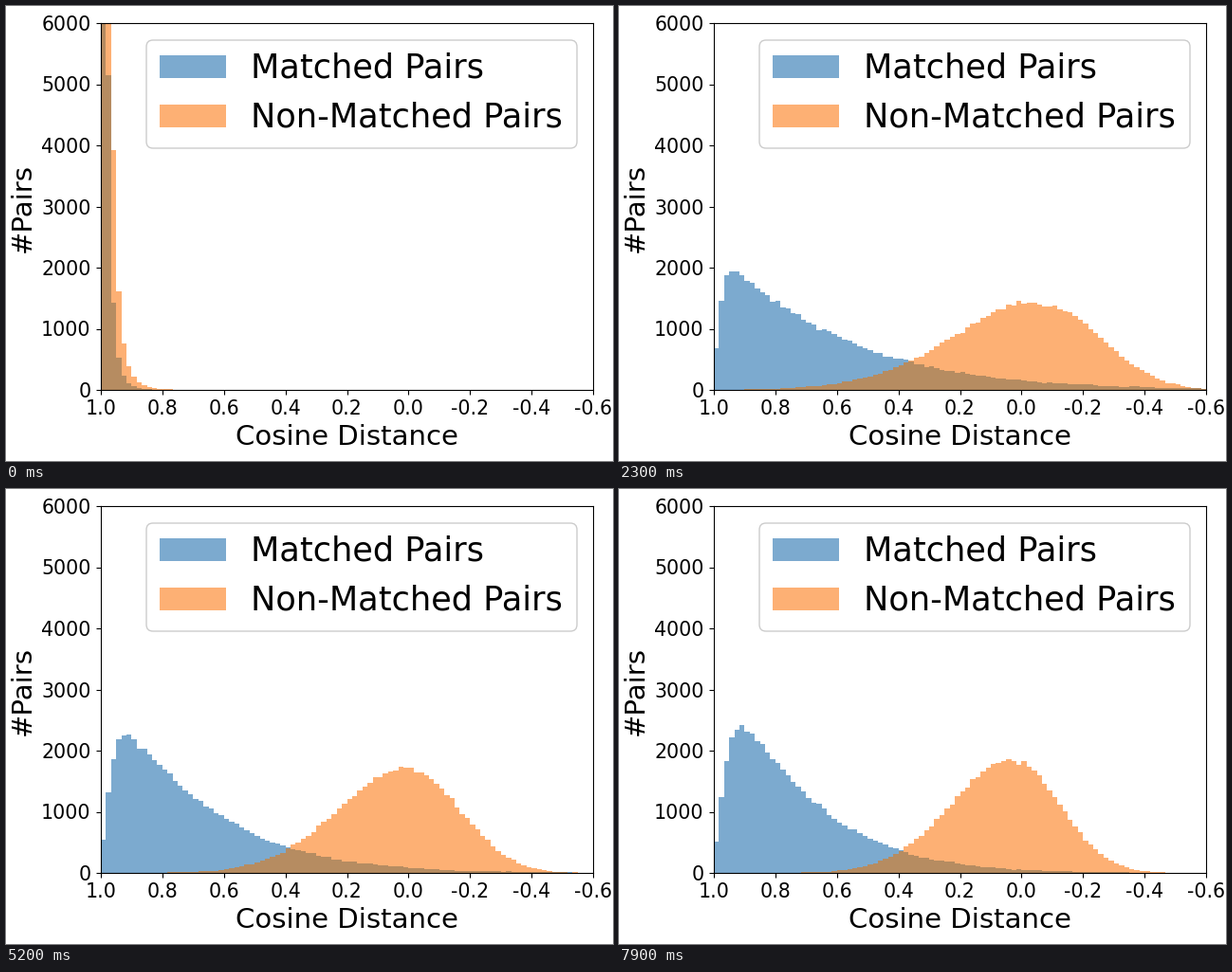
A matplotlib script that plays this animation: 640 by 480 pixels, repeating every 8 s.

```python
import numpy as np
import matplotlib.pyplot as plt
from matplotlib.animation import FuncAnimation
from matplotlib.patches import FancyBboxPatch, Rectangle

W, H, DPI = 640, 480, 100
FRAMES, STEP = 80, 100
BINS = 120
SETTLE = 1.6  # seconds until the first spreading is done
BLUE, ORANGE, BOTH = "#7caacf", "#fdb074", "#b68c61"
TICK, LABEL, LEGEND = 14.8, 21, 25.25

plt.rcParams["font.family"] = "DejaVu Sans"
bins = np.arange(BINS)


def start_shape(first, rate):
    """Steep pile at distance 1.0; `first` is the height of the second bar."""
    return np.minimum(first * np.exp(-rate * (np.sqrt(bins) - 1)), 40000)


def match_shape(g):
    """Quick rise, then a stretched exponential fall."""
    rise = 1 - np.exp(-((bins + 1) / (1.5 + 0.85 * g)) ** 1.6)
    fall = np.exp(-(bins / (27 - 4.3 * g)) ** (1.1 + 0.115 * g))
    return (1950 + 630 * g) * rise * fall


def other_shape(g):
    """Bell with different width and steepness on either side."""
    d = bins - (62 - 3 * g)
    width = np.where(d < 0, 23.5 - 4.4 * g, 20.2 - 4.2 * g)
    power = np.where(d < 0, 1.75 + 0.1 * g, 2.5 - 0.25 * g)
    return (1300 + 340 * g) * np.exp(-(np.abs(d) / width) ** power)


def transport(a, b, s):
    """Move the mass of histogram a towards b by blending their quantiles."""
    edges = np.arange(BINS + 1)
    u = (np.arange(20000) + 0.5) / 20000

    def quantile(h):
        cdf = np.concatenate([[0], np.cumsum(h + 1e-9)])
        return np.interp(u, cdf / cdf[-1], edges)

    pos = (1 - s) * quantile(a) + s * quantile(b)
    total = (1 - s) * a.sum() + s * b.sum()
    return np.histogram(pos, edges)[0] * total / len(u)


def counts(t, start, shape, rng):
    if t == 0:
        return start
    if t < SETTLE:
        h = transport(start, shape(0), np.sin(np.pi / 2 * t / SETTLE))
    else:
        h = shape(np.log(t / SETTLE))
    return np.clip(h + 0.6 * np.sqrt(h) * rng.standard_normal(BINS), 0, None)


SERIES = [(start_shape(5150, 3.1), match_shape),
          (start_shape(12500, 2.8), other_shape)]

fig = plt.figure(figsize=(W / DPI, H / DPI), dpi=DPI, facecolor="white")

# Chart
ax = fig.add_axes([100 / W, 75 / H, 519 / W, 387 / H])
ax.set_xlim(1, -0.6)
ax.set_ylim(0, 6000)
xticks = np.arange(10, -7, -2) / 10
ax.set_xticks(xticks, [f"{x:.1f}" for x in xticks])
ax.set_yticks(range(0, 6001, 1000))
ax.tick_params(labelsize=TICK, length=3.6, pad=3.9, width=0.8)

edges = 1 - np.arange(BINS + 1) / 60
steps = [ax.stairs(np.zeros(BINS), edges, fill=True, color=c, lw=0)
         for c in (BLUE, ORANGE, BOTH)]

# Labels and legend in pixel coordinates
top = fig.add_axes([0, 0, 1, 1])
top.set_xlim(0, W)
top.set_ylim(H, 0)
top.axis("off")
top.text(359, 463, "Cosine Distance", size=LABEL, ha="center", va="baseline")
top.text(26, 213, "#Pairs", size=LABEL, rotation=90, rotation_mode="anchor",
         ha="center", va="baseline")

top.add_patch(FancyBboxPatch((155, 43), 440, 100, boxstyle="round,pad=7,rounding_size=7",
                             fc="white", ec="#cccccc", lw=1))
for y, color, name in [(52, BLUE, "Matched Pairs"), (104, ORANGE, "Non-Matched Pairs")]:
    top.add_patch(Rectangle((162, y), 70, 24, fc=color, lw=0))
    top.text(257.5, y + 24, name, size=LEGEND, va="baseline")


def draw(i):
    rng = np.random.default_rng(100 + i)
    t = i * STEP / 1000
    match, other = (counts(t, start, shape, rng) for start, shape in SERIES)
    for patch, h in zip(steps, (match, other, np.minimum(match, other))):
        patch.set_data(h)
    return steps


anim = FuncAnimation(fig, draw, frames=FRAMES, interval=STEP, repeat=True, repeat_delay=0)
plt.show()
```
